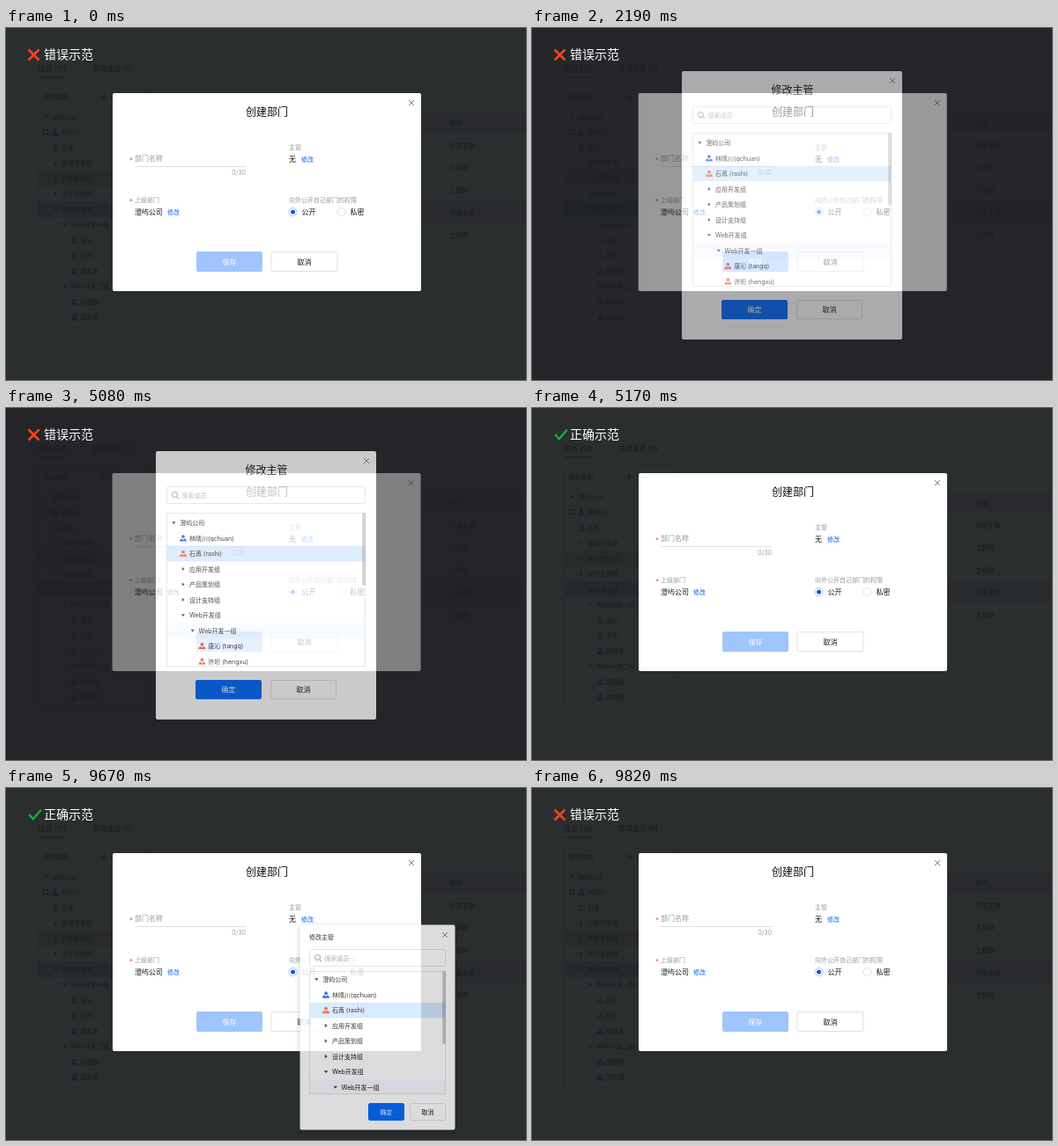
An HTML page for the animation above (9850 ms loop, 590 px wide and 400 px high).

```html
<!DOCTYPE html>
<html lang="zh-CN">
<head>
<meta charset="utf-8">
<style>
html, body { margin: 0; width: 100%; height: 100%; overflow: hidden; background: #2b2f30; }
svg { display: block; width: 590px; height: 400px; font-family: Inter, "Noto Sans CJK SC", "Noto Sans CJK", sans-serif; }
text { white-space: pre; }
#pop { filter: drop-shadow(0 2px 3px #0004); }
</style>
</head>
<body>
<svg id="stage" viewBox="0 0 590 400"></svg>
<script>
const INK = '#111', GREY = '#999', LINE = '#e0e0e0', BLUE = '#0066fc', RED = '#f0562f';
const ROW = 17.5;

// y is the vertical middle of the text
const text = (x, y, s, size = 7, fill = INK, anchor = 'start', weight = 400) =>
  `<text x="${x}" y="${y + size * .38}" font-size="${size}" fill="${fill}" text-anchor="${anchor}" font-weight="${weight}">${s}</text>`;
const rect = (x, y, w, h, fill, stroke = 'none', r = 0) =>
  `<rect x="${x}" y="${y}" width="${w}" height="${h}" rx="${r}" fill="${fill}" stroke="${stroke}"/>`;
const path = (d, stroke, width = 1, fill = 'none') =>
  `<path d="${d}" stroke="${stroke}" stroke-width="${width}" fill="${fill}"/>`;
const circle = (x, y, r, fill, stroke = 'none') =>
  `<circle cx="${x}" cy="${y}" r="${r}" fill="${fill}" stroke="${stroke}"/>`;
const group = (id, body) => `<g id="${id}">${body}</g>`;

const close = (x, y) => path(`M${x - 3} ${y - 3}l6 6m0-6l-6 6`, '#777', .9);

const button = (x, y, w, h, label, size, fill) =>
  rect(x + .5, y + .5, w - 1, h - 1, fill || '#fff', fill || LINE, 1.5) +
  text(x + w / 2, y + h / 2, label, size, fill ? '#fff' : INK, 'middle', fill ? 500 : 400);

const person = (x, y, fill) => circle(x, y - 1.8, 1.9, fill) +
  path(`M${x - 4} ${y + 3.7}c0-2.2 1.2-2.8 2.6-3.4l1.4 2 1.4-2c1.4.6 2.6 1.2 2.6 3.4z`, 'none', 0, fill);

const search = (x, y, w) => rect(x + .5, y + .5, w - 1, 19, '#fff', LINE, 1) +
  circle(x + 9.5, y + 9.5, 3, 'none', '#888') +
  path(`M${x + 11.7} ${y + 11.7}l2.3 2.3`, '#888') +
  text(x + 17.5, y + 10, '搜索成员', 7, '#aaa');

const marks = {
  v: (x, y) => path(`M${x - 2.2} ${y - 1.2}h4.4l-2.2 2.8z`, 'none', 0, '#333'),
  h: (x, y) => path(`M${x - 1.2} ${y - 2.2}v4.4l2.8-2.2z`, 'none', 0, '#333'),
  b: (x, y) => person(x, y, '#1457e0'),
  r: (x, y) => person(x, y, RED)
};

// level, mark, label
const team = [
  [0, 'v', '澄屿公司'], [1, 'b', '林晴川(qchuan)'], [1, 'r', '石苒 (rashi)'],
  [1, 'h', '应用开发组'], [1, 'h', '产品策划组'], [1, 'h', '设计支持组'],
  [1, 'v', 'Web开发组'], [2, 'v', 'Web开发一组'],
  [3, 'r', '唐沁 (tangq)'], [3, 'r', '许珩 (hengxu)']
];
const staff = team.map(([n, m, s]) => [n, m, s.replace(/ ?\(.*/, '')]).concat([
  [3, 'b', '顾念禾'], [2, 'v', 'Web开发二组'], [3, 'b', '邵庭秋'], [3, 'b', '温知夏']
]);

const tree = (x, y, w, rows, tints) => rows.map(([level, mark, label], i) => {
  const cy = y + i * ROW, cx = x + level * 10.7;
  return (tints[i] ? rect(x, cy - ROW / 2, w, ROW, tints[i]) : '') +
    marks[mark](cx + 8.3, cy) + text(cx + 15.2, cy, label);
}).join('');

const picker = (x, y, w, h, count, pad) =>
  tree(x, y + pad, w, team.slice(0, count), { 2: '#d2e8fd', 7: '#f6faff' }) +
  rect(x + .5, y + .5, w - 1, h - 1, 'none', LINE) +
  rect(x + w - 4, y, 4, 83, '#0003', 'none', 2);

const page = rect(0, 0, 590, 400, '#fff') +
  text(36, 46, '成员 (12)', 8, '#000') + text(98, 46, '禁用成员 (5)', 8, '#000') +
  rect(36, 55, 31, 1.5, '#777') +
  rect(36.5, 65.5, 126, 275, 'none', '#bbb') +
  text(42, 78, '组织架构', 7, '#000') +
  path('M107 78h8m-4-4v8', '#000') + text(118, 78, '添加') +
  tree(37, 101, 126, staff, { 4: '#dcc', 6: '#a8c0f0' }) +
  rect(42.5, 115.5, 5, 5, 'none', '#333') +
  rect(195, 97, 395, 22, '#dcd0e0') + rect(195, 197, 395, 24, '#d4d0e4') +
  ['职务', '开发主管', '工程师', '工程师', '开发主管', '工程师']
    .map((s, i) => text(503.5, 108 + i * 25.4, s, 7, '#000')).join('') +
  rect(0, 0, 590, 400, 'rgba(25,29,30,.92)');

const star = y => text(140, y + 1, '*', 8, RED);
const form = rect(121, 74, 350, 225, '#fff', 'none', 2) + close(460, 85) +
  text(296, 95, '创建部门', 12, INK, 'middle') +
  star(149) + text(146, 148, '部门名称', 8, GREY) +
  rect(146, 157, 126, 1, LINE) + text(272, 164, '0/30', 7, GREY, 'end') +
  text(321, 135, '主管', 7, GREY) + text(321, 149, '无', 8) + text(335, 149, '修改', 7, BLUE) +
  star(196) + text(146, 195, '上级部门', 7, GREY) +
  text(146, 209, '澄屿公司', 8) + text(183, 209, '修改', 7, BLUE) +
  text(321, 195, '向外公开自己部门的权限', 7, GREY) +
  circle(325.5, 209, 4.6, '#fff', '#a9c8f8') + circle(325.5, 209, 2.5, '#1457e0') +
  text(335.5, 209, '公开', 8) +
  circle(380.5, 209, 4.6, '#fff', LINE) + text(390.5, 209, '私密', 8) +
  button(216, 254, 75, 23, '保存', 8, '#9fc5fc') + button(300.5, 254, 76, 23, '取消', 8);

// the whole scene behind the modal sits one pixel to the left
const modal = page + `<g transform="translate(-1)">${form}</g>` +
  rect(0, 0, 590, 400, 'rgba(30,30,35,.75)') +
  rect(170, 49, 250, 305, '#fff', 'none', 2) + close(409, 60) +
  text(295.5, 70, '修改主管', 12, INK, 'middle') +
  search(182, 89, 226) + picker(182, 119, 226, 175, 10, 11.4) +
  button(215, 309, 75, 22, '确定', 8, BLUE) + button(300, 309, 75, 22, '取消', 8);

const pop = rect(333.5, 155.5, 176, 233, '#fff', 'none', 2) + close(498, 167) +
  text(344, 169, '修改主管', 7, INK, 'start', 500) +
  search(344, 183, 155) + picker(344, 208, 155, 140, 8, 9.5) +
  button(411, 358, 41, 20, '确定', 7, BLUE) + button(458, 358, 41, 20, '取消', 7);

const title = s => text(43, 30, s, 14, '#fff', 'start', 500);

const $ = id => document.getElementById(id);
$('stage').innerHTML = page + form + group('modal', modal) + group('pop', pop) +
  group('wrong', path('M25.5 24.5l12 12m0-12l-12 12', '#f4441c', 2.6) + title('错误示范')) +
  group('right', path('M26.2 30l4.6 5.2 9-10.4', '#12b52c', 2.4) + title('正确示范'));

// fade progress in n steps of 30 ms
const fade = (t, start, n) => Math.max(0, Math.min(1, (Math.floor((t - start) / 30) + 1) / n));
const show = (id, a) => {
  $(id).style.opacity = a;
  $(id).style.display = a > 0 ? '' : 'none';
};

function draw() {
  const t = performance.now() % 9850;
  const right = t >= 5170 && t < 9820;
  show('modal', t < 5080 ? fade(t, 2130, 5) : 1 - fade(t, 5080, 4));
  show('pop', t < 7070 ? 0 : 1 - fade(t, 9670, 6));
  show('right', +right);
  show('wrong', +!right);
  requestAnimationFrame(draw);
}
draw();
</script>
</body>
</html>
```
